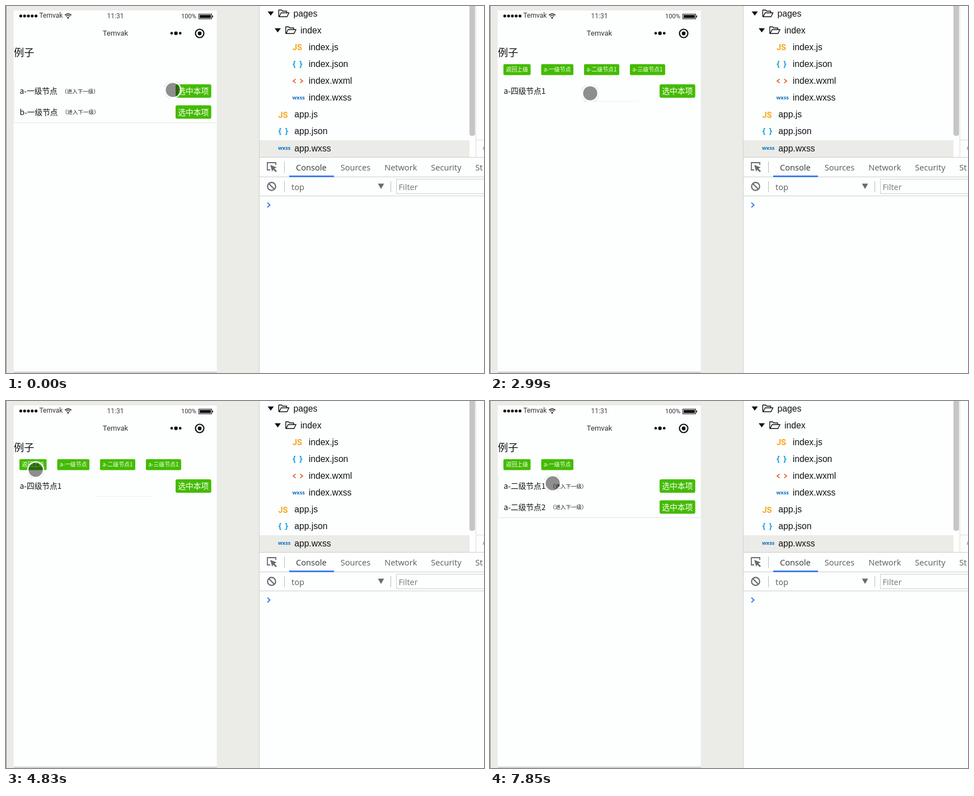
An HTML page with a canvas for the animation above (8 s loop, 854 by 656 pixels).

```html
<!DOCTYPE html>
<html lang="zh-CN">
<head>
<meta charset="utf-8">
<title>例子</title>
<style>
html, body { margin: 0; width: 100%; height: 100%; overflow: hidden; background: #ebebe7; }
canvas { display: block; width: 854px; height: 656px; }
</style>
</head>
<body>
<canvas id="stage" width="854" height="656"></canvas>
<script>
const ctx = document.getElementById('stage').getContext('2d');
const LOOP = 8000, STEP = 135;
const PAPER = '#fdfefe', GREEN = '#44bb00', INK = '#111', GREY = '#6a6a6a', RULE = '#cdcdcd', BLUE = '#3f7fe8';
const CJK = '"Noto Sans CJK SC", "Noto Sans CJK", "Noto Sans CJK JP", sans-serif';
const ARIAL = '15.7px "Liberation Sans", Arial, sans-serif';
const OPEN = '"Open Sans", sans-serif';
const ROBOTO = 'Roboto, sans-serif';
const APP = 'Temvak';

// Clicks that open a node, and clicks that go back up
const opens = [900, 1440, 2000, 7850];
const backs = [5510, 6050, 6660];

// Pointer glides: first step, last step, end point
const home = { x: 298, y: 150 };
const glides = [
  [150, 280, 249, 150],
  [2990, 2990, 179, 156],
  [3120, 3400, 59, 126],
  [3550, 3820, 57, 122],
  [4100, 4100, 145, 211],
  [4530, 4680, 57, 152],
  [4830, 4950, 51, 113],
  [7340, 7590, 112, 147]
];

const levels = '一二三四';
const siblings = [2, 2, 3, 1];

const passed = (times, t) => times.filter(s => s <= t).length;
const depthAt = t => passed(opens, t) - passed(backs, t);
const nodeName = (depth, i) => depth
  ? `a-${levels[depth]}级节点${i + 1}`
  : `${'ab'[i]}-一级节点`;

// Each glide eases out in a few visible steps
function pointerAt(t) {
  let { x, y } = home;
  for (const [from, to, tx, ty] of glides) {
    if (t < from) break;
    const count = Math.round((to - from) / STEP) + 1;
    const done = t >= to ? 1 : (Math.floor((t - from) / STEP) + 1) / count;
    const ease = 1 - (1 - Math.min(done, 1)) ** 2;
    x += (tx - x) * ease;
    y += (ty - y) * ease;
  }
  return [Math.round(x), Math.round(y)];
}

function rect(x, y, w, h, color) {
  ctx.fillStyle = color;
  ctx.fillRect(x, y, w, h);
}

function frame(x, y, w, h, color) {
  ctx.strokeStyle = color;
  ctx.lineWidth = 1;
  ctx.strokeRect(x, y, w, h);
}

function text(str, x, y, font, color = INK, align = 'left') {
  ctx.font = font;
  ctx.fillStyle = color;
  ctx.textAlign = align;
  ctx.fillText(str, x, y);
}

function dot(x, y, r, color = INK) {
  ctx.fillStyle = color;
  ctx.beginPath();
  ctx.arc(x, y, r, 0, 7);
  ctx.fill();
}

function arc(x, y, r, width, color, from = 0, to = Math.PI * 2) {
  ctx.strokeStyle = color;
  ctx.lineWidth = width;
  ctx.beginPath();
  ctx.arc(x, y, r, from, to);
  ctx.stroke();
}

function line(d, width, color, x = 0, y = 0) {
  ctx.save();
  ctx.translate(x, y);
  ctx.strokeStyle = color;
  ctx.lineWidth = width;
  ctx.stroke(new Path2D(d));
  ctx.restore();
}

function shape(d, color, x = 0, y = 0) {
  ctx.save();
  ctx.translate(x, y);
  ctx.fillStyle = color;
  ctx.fill(new Path2D(d));
  ctx.restore();
}

function pill(x, y, w, h, r, color) {
  ctx.fillStyle = color;
  ctx.beginPath();
  ctx.roundRect(x, y, w, h, r);
  ctx.fill();
}

const icons = {
  js: (x, y) => text('JS', x, y + 6, '700 14.5px ' + ROBOTO, '#f5a81c'),
  json(x, y) {
    text('{', x, y + 4.5, '700 14.5px ' + OPEN, '#1ba1dc');
    text('}', x + 12, y + 4.5, '700 14.5px ' + OPEN, '#1ba1dc');
  },
  wxml: (x, y) => line('M5.5-3L1 .5 5.5 4M13.5-3L18 .5 13.5 4', 1.8, '#e8632c', x, y),
  wxss: (x, y) => text('wxss', x - .5, y + 3, '700 9.2px ' + OPEN, '#0f6fba')
};

function file(name, x, y) {
  icons[name.split('.')[1]](x, y);
  text(name, x + 28.7, y + 5.5, ARIAL);
}

function folder(name, x, y) {
  shape('M-5.5-3.5h11L0 4z', INK, x, y);
  line('M2 13L.8 12V1H6L8 3H15V6M1.5 13L5 6H19L15.5 13z', 1.4, INK, x + 13.5, y - 7);
  text(name, x + 40.5, y + 5.5, ARIAL);
}

function drawTree() {
  rect(452, 0, 402, 656, PAPER);
  rect(452, 0, 1, 656, '#cfcfcc');
  rect(453, 240, 375, 30, '#ebebe8');
  const rowY = i => 13.2 + i * 30.1;
  folder('pages', 473, rowY(0));
  folder('index', 485.5, rowY(1));
  ['index.js', 'index.json', 'index.wxml', 'index.wxss', 'app.js', 'app.json', 'app.wxss']
    .forEach((name, i) => file(name, i < 4 ? 512 : 486.5, rowY(i + 2)));
  pill(828, -8, 10, 240, 4, '#c5c6c5');
  rect(839, 0, 1, 270, '#dcdcdc');
  rect(840, 239, 14, 1, '#dcdcdc');
  line('M854 251L852.5 257', 1, '#777');
}

function drawConsole() {
  const font = '14.6px ' + OPEN;
  for (const y of [270, 305, 339]) rect(453, y, 401, 1, RULE);

  line('M472 293H467V280H482V284', 1.8, GREY);
  shape('M472 284L483.5 288.5 479.5 290.5 484 295 482 297 477.5 292.5 475.5 296z', GREY);
  rect(497, 278, 1, 20, '#bbb');
  let x = 518;
  ['Console', 'Sources', 'Network', 'Security', 'St'].forEach((name, i) => {
    text(name, x, 294, font, i ? '#5a5a5a' : '#333');
    x += ctx.measureText(name).width + 25;
  });
  rect(506, 303, 80, 3, BLUE);

  arc(474.5, 322.5, 7.2, 2.2, GREY);
  line('M469.5 317.5L479.5 327.5', 2.2, GREY);
  rect(497, 313, 1, 20, '#bbb');
  text('top', 510, 328.5, font, '#5a5a5a');
  shape('M664.5 317.5H675.5L670 327z', GREY);
  rect(687, 313, 1, 20, '#bbb');
  frame(697.5, 309.5, 170, 26, RULE);
  text('Filter', 701.5, 328.5, font, '#777');
  line('M467 351.5L471.5 355.8 467 360', 2, BLUE);
}

function drawPhone() {
  rect(0, 0, 452, 656, '#ebebe7');
  rect(0, 0, 1, 656, '#8d8d8b');
  rect(13.7, 8, 363, 646, PAPER);
  rect(14, 653.5, 363, 2.5, '#d2d2cf');

  for (let i = 0; i < 5; i++) dot(26.4 + i * 6.8, 17.8, 2.6);
  text(APP, 59.5, 21.3, '12px ' + ROBOTO, '#333');
  for (const r of [8, 5]) arc(111, 22, r, 1.7, INK, -2.35, -.79);
  dot(111, 21, 1.5);
  text('11:31', 195.5, 21.5, '12px ' + ROBOTO, '#444', 'center');
  text('100%', 313, 22, '11.2px ' + ROBOTO, '#333');
  frame(344.5, 14.5, 23, 8.5, INK);
  rect(346, 16, 20, 5.5, INK);
  rect(368.5, 17, 1.5, 3.5, INK);

  text(APP, 195.5, 53.3, '13px ' + ROBOTO, '#333', 'center');
  for (const i of [-1, 0, 1]) dot(303.6 + i * 7.6, 48.7, i ? 2.4 : 3.2);
  arc(346, 49, 7.5, 2.2, INK);
  dot(346, 49, 3.4);
  text('例子', 14, 90, '18.2px ' + CJK);
}

function drawCrumbs(depth) {
  const font = '9.9px ' + CJK;
  let x = 24;
  for (let i = 0; i <= depth; i++) {
    const label = i ? nodeName(i - 1, 0) : '返回上级';
    ctx.font = font;
    const w = ctx.measureText(label).width + 9;
    pill(x, 104, w, 19.5, 2, GREEN);
    text(label, x + 4.5, 117.4, font, '#fff');
    x += w + 19;
  }
}

function drawRows(depth) {
  for (let i = 0; i < siblings[depth]; i++) {
    const y = 140 + i * 37.5, label = nodeName(depth, i);
    text(label, 24.5, y + 17.3, '13.7px ' + CJK);
    if (depth < 2 || (depth === 2 && i === 0)) {
      const end = 24.5 + ctx.measureText(label).width;
      text('（进入下一级）', end + 7.5, y + 15.6, '9.5px ' + CJK, '#222');
    }
    pill(303, y, 63.7, 24, 3, GREEN);
    text('选中本项', 334.8, y + 17.3, '13.8px ' + CJK, '#fff', 'center');
    if (depth < 3) rect(14, y - 8, 1, 36, '#ececec');
  }
  if (depth < 3) rect(14, 208, 363, 1, '#e4e4e4');
  else rect(162, 170, 102, 1, '#f0f0f0');
}

function drawPointer(x, y) {
  arc(x, y, 14.2, 2.4, 'rgba(255,255,255,.88)');
  dot(x, y, 12.6, 'rgba(0,0,0,.44)');
  ctx.setLineDash([1.5, 1.5]);
  for (let i = 0; i < 4; i++) {
    const mid = Math.PI * (i / 2 + .25);
    arc(x, y, 16, 1, 'rgba(130,130,130,.6)', mid - .38, mid + .38);
  }
  ctx.setLineDash([]);
}

function draw(t) {
  const depth = depthAt(t);
  drawPhone();
  if (depth) drawCrumbs(depth);
  drawRows(depth);
  drawPointer(...pointerAt(t));
  drawTree();
  drawConsole();
}

const start = performance.now();

function tick() {
  draw((performance.now() - start) % LOOP);
  requestAnimationFrame(tick);
}

tick();
</script>
</body>
</html>
```
